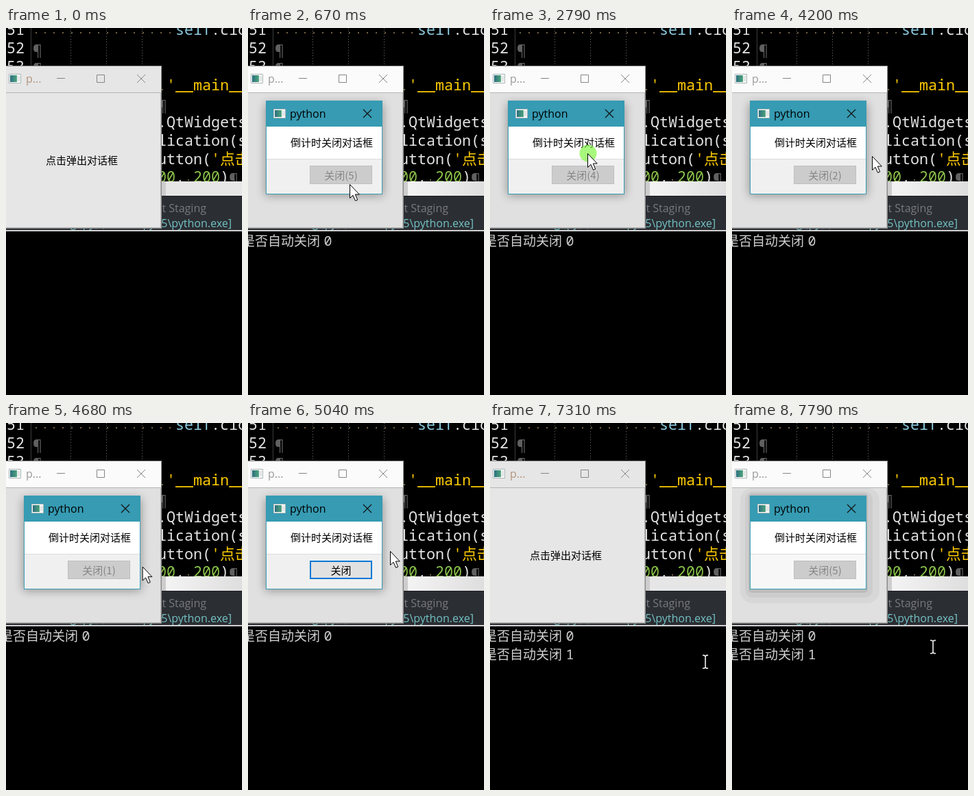
An HTML page for the animation above (8 s loop, 344 by 536 pixels).

```html
<!DOCTYPE html>
<html lang="zh">
<head>
<meta charset="utf-8">
<style>
  html, body { margin: 0; width: 100%; height: 100%; overflow: hidden; background: #000; }
  svg { display: block; width: 344px; height: 536px; }
  text { font: 15px "Noto Sans CJK SC", "Noto Sans CJK", sans-serif; white-space: pre; }
  .ui { font: 16px "Open Sans", sans-serif; }
  .code text { font: 21.67px "Noto Sans Mono", "Noto Sans CJK SC", monospace; fill: #e4e4e4; }
  .code .mark { fill: #606060; }
  .code .str { fill: #fc0; }
  .code .num { fill: #8bc34a; }
  .console text { font-size: 19px; font-weight: 300; fill: #d0d0d0; }
  .console .digit { font: 20px "Noto Sans Mono", monospace; }
</style>
</head>
<body>
<svg viewBox="0 0 344 536">
  <defs>
    <linearGradient id="steel"><stop stop-color="#2d6f80"/><stop offset="1" stop-color="#4fa57c"/></linearGradient>
    <linearGradient id="shine">
      <stop stop-color="#f4f4f4"/><stop offset=".4" stop-color="#ececec"/><stop offset="1" stop-color="#dedede"/>
    </linearGradient>
    <filter id="soft" x="-20%" y="-20%" width="140%" height="140%"><feGaussianBlur stdDeviation="7"/></filter>
    <g id="icon">
      <path d="M.5.5h17v13H.5z" fill="#fff" stroke="#a9b4b4"/>
      <path d="M2 2h10v10H2z" fill="url(#steel)"/>
      <path d="M13.500 3v8M15.500 3v8" stroke="#c5d0d0"/>
    </g>
    <path id="cross" d="M0 0l12 12M12 0L0 12"/>
  </defs>

  <rect width="344" height="536"/>

  <g class="code">
    <path d="M36.500 0V56" stroke="#3c3c3c"/>
    <path d="M94.500 0V56M146.500 0V56M198.500 0V56" stroke="#707070" stroke-dasharray="1 3"/>
    <path d="M43 7H246M227 90h2M265 222h2" stroke="#75634a" stroke-width="2" stroke-dasharray="2 11"/>
    <text x="1" y="10">51</text>
    <text x="1" y="37">52</text>
    <text x="1" y="64">53</text>
    <text x="247" y="10"><tspan fill="#8ccbe0">self</tspan>.clo</text>
    <text class="mark" x="39" y="41">¶</text>
    <text class="mark" x="39" y="68">¶</text>
    <text class="str" x="234" y="91">'__main__'</text>
    <text class="mark" x="221" y="122">¶</text>
    <text x="221" y="145">.QtWidgets</text>
    <text x="221" y="172">lication(s</text>
    <text x="221" y="199">utton(<tspan class="str">'点击</tspan></text>
    <text x="221" y="225"><tspan class="num">00</tspan>, <tspan class="num">200</tspan>)<tspan class="mark" dy="4">¶</tspan></text>
  </g>

  <rect id="strip" y="224" x="227" width="117" height="21"/>
  <rect y="224" x="227" width="6" height="21" fill="#cdcdcd"/>
  <rect y="245" width="344" height="51" fill="#2b2e33"/>
  <path d="M0 245.500H344" stroke="#1b1d21"/>
  <text class="ui" x="292" y="269" text-anchor="end" fill="#777a80">Git Staging</text>
  <text class="ui" x="329" y="291" text-anchor="end" fill="#73c2c4">Running [py] (D:\soft\py35\python.exe]</text>
  <path d="M0 296H344" stroke="#d0d0d0" stroke-width="2"/>

  <g class="console">
    <g id="line0"><text x="-9" y="318">是否自动关闭</text><text class="digit" x="110.500" y="318">0</text></g>
    <g id="line1"><text x="-9" y="345">是否自动关闭</text><text class="digit" x="110.500" y="345">1</text></g>
  </g>

  <rect y="55" width="227" height="238" fill="#8c8c8c"/>
  <rect id="caption" y="56" width="226" height="38"/>
  <rect id="body" y="94" width="226" height="198"/>
  <path d="M0 94.500H226M225.500 95V291.500H0" stroke="#b4b4b4" fill="none"/>
  <use href="#icon" x="4" y="67"/>
  <text id="name" class="ui" x="29" y="80">p...</text>
  <g fill="none" stroke="#858585">
    <path d="M74 73.500h12M132.500 68.500h11v11h-11z"/>
    <use href="#cross" x="191" y="68"/>
  </g>
  <text x="58" y="199">点击弹出对话框</text>

  <g id="dialog">
    <rect id="shadow" x="25" y="110" width="172" height="135" opacity=".34" filter="url(#soft)"/>
    <g id="bands">
      <rect x="12" y="95" width="203" height="168" rx="18" fill="#d7d7d7"/>
      <rect x="19" y="100" width="186" height="155" rx="12" fill="#cdcdcd"/>
      <rect x="24" y="103" width="174" height="145" rx="5" fill="#bcbcbc"/>
    </g>
    <rect x="26" y="106" width="170" height="137" fill="#369bb3"/>
    <rect x="27" y="144" width="168" height="47" fill="#fff"/>
    <rect id="panel" x="27" y="191" width="168" height="51"/>
    <path d="M27 191.500h168" stroke="#dcdcdc"/>
    <use href="#icon" x="37" y="118"/>
    <text class="ui" x="61" y="131">python</text>
    <use href="#cross" x="168" y="119" stroke="#111" stroke-width="1.200"/>
    <text x="62" y="173">倒计时关闭对话框</text>
    <rect id="button"/>
    <text id="label" x="135.500" y="221" text-anchor="middle"></text>
  </g>

  <g id="pointer">
    <circle id="click" cx="1" r="12.500" fill="#7cf43c" opacity=".67"/>
    <path id="arrow" d="M.5.5V20.500L5 16.300 8.500 24.300 11.700 23 8.300 15H14.300Z" fill="#fff" stroke="#000"/>
    <path id="beam" d="M-4-9.500h2.500L0-8 1.500-9.500H4M0-8V8M-4 9.500h2.500L0 8 1.500 9.500H4" fill="none" stroke="#fff" stroke-width="1.500"/>
  </g>
</svg>
<script>
const LOOP = 8000;
const el = id => document.getElementById(id);
const set = (id, attrs) => { for (const k in attrs) el(id).setAttribute(k, attrs[k]); };
const show = (id, on) => set(id, { visibility: on ? 'inherit' : 'hidden' });
const ramp = (t, from, to) => Math.min(1, Math.max(0, (t - from) / (to - from)));
const within = (t, from, to) => t >= from && t < to;

// time, x, y
const path = [
  [0, 148, 228], [1000, 148, 228], [1240, 163, 250], [2420, 163, 250], [2600, 142, 183],
  [2920, 142, 183], [3400, 200, 188], [4190, 200, 188], [4200, 204, 187], [4480, 194, 222],
  [4980, 207, 187], [5620, 207, 187], [5980, 156, 213], [6560, 156, 213],
  [6800, 298, 362], [6920, 315, 350], [7250, 315, 350], [7700, 293, 327], [LOOP, 293, 327]
];

function pointerAt(t) {
  const i = path.findIndex(p => p[0] > t);
  const [t0, x0, y0] = path[i - 1], [t1, x1, y1] = path[i];
  const u = ramp(t, t0, t1), k = u * u * (3 - 2 * u);
  return [x0 + (x1 - x0) * k, y0 + (y1 - y0) * k];
}

function countdown(t) {
  if (t >= 7250) return 5;
  return 5 - [2090, 2910, 3740, 4500, 5040].filter(at => t >= at).length;
}

function drawDialog(t, third) {
  const alpha = third ? ramp(t, 7340, 7560) : ramp(t, 50, 260) * (1 - ramp(t, 6550, 6690));
  const open = t >= 60 && alpha > 0;
  const scale = .92 + .08 * alpha;
  show('dialog', open);
  set('dialog', {
    opacity: alpha,
    transform: `translate(111 174.5) scale(${scale}) translate(-111 -174.5)`
  });
  show('shadow', !third);
  show('bands', third);
  set('panel', { fill: third ? '#f7f7f7' : '#f0f0f0' });
  set('caption', { fill: open ? '#fbfbfb' : '#e6e6e6' });
  set('body', { fill: open ? '#e0e0e0' : '#e6e6e6' });
  set('name', { fill: open ? '#999' : '#b3937c' });
  set('strip', { fill: open ? 'url(#shine)' : '#e6e6e6' });
}

function drawButton(t, x, y) {
  const left = countdown(t), enabled = left === 0;
  const hover = enabled && x < 181 && y > 201;
  const edge = enabled && !hover ? 2 : 1;
  set('button', {
    x: 90 + edge / 2, y: 201 + edge / 2, width: 91 - edge, height: 27 - edge, 'stroke-width': edge,
    fill: hover ? '#ddebf8' : enabled ? '#e1e1e1' : '#ccc',
    stroke: enabled ? '#0078d7' : '#bfbfbf'
  });
  set('label', { fill: enabled ? '#000' : '#858585' });
  el('label').textContent = enabled ? '关闭' : `关闭(${left})`;
}

function draw(t) {
  const [x, y] = pointerAt(t);
  drawDialog(t, t >= 7250);
  drawButton(t, x, y);
  show('line0', t >= 120);
  show('line1', t >= 7310);
  show('pointer', t >= 300);
  set('pointer', { transform: `translate(${x} ${y})` });
  show('click', within(t, 2790, 2920) || within(t, 6500, 6600));
  show('arrow', y < 297);
  show('beam', y >= 297);
}

const start = performance.now();
function tick() {
  draw((performance.now() - start) % LOOP);
  requestAnimationFrame(tick);
}
tick();
</script>
</body>
</html>
```
